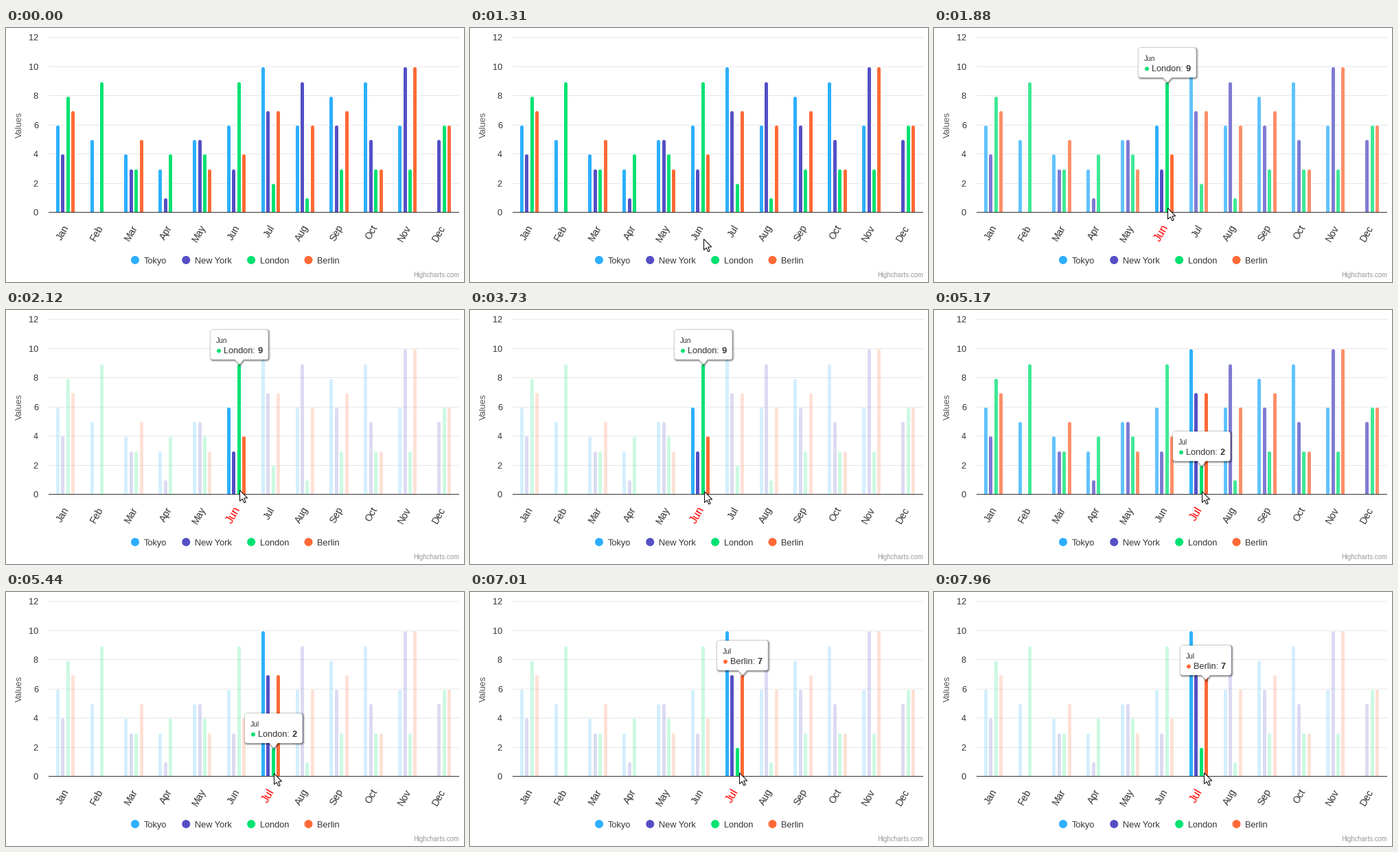
A matplotlib script for the animation above (8000 ms loop, 667 by 370 pixels).

```python
import numpy as np
import matplotlib.pyplot as plt
from matplotlib.animation import FuncAnimation
from matplotlib.collections import PolyCollection
from matplotlib.colors import to_rgb
from matplotlib.patches import Circle, PathPatch, Polygon, Rectangle
from matplotlib.path import Path

W, H, DPI = 667, 370, 100
STEP, LOOP = 40, 8000
PX = 72 / DPI
LEFT, RIGHT, TOP, BASE = 62, 660, 13, 268
SLOT = (RIGHT - LEFT) / 12
INK = "#333333"

plt.rcParams["font.family"] = "Liberation Sans"

MONTHS = "Jan Feb Mar Apr May Jun Jul Aug Sep Oct Nov Dec".split()
JUN, JUL = 5, 6
LONDON, BERLIN = 2, 3
SERIES = [
    ("Tokyo", "#2caffe", [6, 5, 4, 3, 5, 6, 10, 6, 8, 9, 6, 0]),
    ("New York", "#544fc5", [4, 0, 3, 1, 5, 3, 7, 9, 6, 5, 10, 5]),
    ("London", "#00e272", [8, 9, 3, 4, 4, 9, 2, 1, 3, 3, 3, 6]),
    ("Berlin", "#fe6a35", [7, 0, 5, 0, 3, 4, 7, 6, 7, 3, 10, 6]),
]

# Hover events in ms
ENTER_JUN, LEAVE_JUN, HIDE_TIP, ENTER_JUL = 1750, 3920, 4400, 5030
SWITCHES = [(6390, BERLIN), (7025, LONDON), (7750, BERLIN)]

# Pointer moves: start, end, destination
MOVES = [(50, 510, (340, 315)), (1190, 1880, (340, 262)),
         (3710, 4210, (365, 302)), (4560, 5170, (390, 264))]
MOVES += [(t - 50, t + 30, (393.4 if s == BERLIN else 390, 263)) for t, s in SWITCHES]

fig = plt.figure(figsize=(W / DPI, H / DPI), dpi=DPI, facecolor="white")
ax = fig.add_axes([0, 0, 1, 1])
ax.set_xlim(0, W)
ax.set_ylim(H, 0)
ax.axis("off")


def label(x, y, s, size=12.8, color=INK, **kw):
    return ax.text(x, y, s, fontsize=size * PX, color=color, **kw)


def text_width(s):
    probe = label(0, 0, s)
    width = probe.get_window_extent().width
    probe.remove()
    return width


def rule(row, color, z):
    ax.add_patch(Rectangle((LEFT, row), RIGHT - LEFT, 1, fc=color, lw=0, zorder=z))


def center(month):
    return LEFT + SLOT * (month + 0.5)


def bar_box(series, month):
    """Left edge and top of one column, on whole pixels."""
    group = SLOT * 0.6
    x = np.floor(center(month) + (series - 1.5) * group / 4 - 2.49)
    unit = (BASE - TOP - 1) / 12
    return x, np.floor(BASE + 1.6 - unit * SERIES[series][2][month])


def bar_shape(x, top, grow=0):
    r = 2.5 + grow
    a = np.linspace(np.pi, 2 * np.pi, 13)
    arc = np.column_stack([x + 2.5 + r * np.cos(a), top + 2.5 + r * np.sin(a)])
    return np.vstack([arc, (x + 5 + grow, BASE), (x - grow, BASE)])


# Axes
for v in range(0, 13, 2):
    row = np.floor(BASE + 0.5 - (BASE - TOP) * v / 12)
    rule(row, "#e6e6e6" if v else INK, 1 if v else 4)
    label(47, row + 5, str(v), ha="right")
label(22.5, 140.5, "Values", color="#555555", rotation=90, rotation_mode="anchor", ha="center")
label(RIGHT, 363, "Highcharts.com", 9.6, "#999999", ha="right")
ticks = [label(center(i) + 5.5, 290, m, 14, rotation=60, rotation_mode="anchor", ha="right")
         for i, m in enumerate(MONTHS)]

# Legend, each item following the text before it
x = 188
for name, color, _ in SERIES:
    ax.add_patch(Circle((x, 338), 6, fc=color, lw=0))
    label(x + 13, 343, name)
    x += 13 + text_width(name) + 28

# Columns, each on a white outline
cells = [(s, m) for s in range(4) for m in range(12) if SERIES[s][2][m]]
months = np.array([m for _, m in cells])
rims = PolyCollection([bar_shape(*bar_box(*c), grow=1) for c in cells], lw=0, zorder=2)
bars = PolyCollection([bar_shape(*bar_box(*c)) for c in cells], lw=0, zorder=3)
bar_rgba = np.array([(*to_rgb(SERIES[s][1]), 1) for s, _ in cells])
rim_rgba = np.ones_like(bar_rgba)
ax.add_collection(rims)
ax.add_collection(bars)

# Tooltip and pointer
TIP_H, ARROW = 43, 7
TIP_W = {s: 27 + text_width(SERIES[s][0] + ": 0") for s in (LONDON, BERLIN)}


def tip_home(series, month):
    x, top = bar_box(series, month)
    return np.array([x + 3 - TIP_W[series] / 2, top - TIP_H - ARROW])


def tip_shape(x, y, w, r=3):
    b, m, e = y + TIP_H, x + w / 2, x + w
    M, L, C = Path.MOVETO, Path.LINETO, Path.CURVE3
    pts = [(x + r, y), (e - r, y), (e, y), (e, y + r), (e, b - r), (e, b), (e - r, b),
           (m + 6, b), (m, b + ARROW), (m - 6, b), (x + r, b), (x, b), (x, b - r),
           (x, y + r), (x, y), (x + r, y)]
    return Path(pts, [M, L, C, C, L, C, C, L, L, L, L, C, C, L, C, C])


blank = tip_shape(0, 0, 80)
shadows = [ax.add_patch(PathPatch(blank, fill=False, ec="black", lw=w * PX, zorder=6))
           for w in (6, 4, 2)]
tip_box = ax.add_patch(PathPatch(blank, fc="white", lw=0, zorder=7))
tip_dot = ax.add_patch(Circle((0, 0), 3, lw=0, zorder=8))
tip_head = label(0, 0, "", 10.2, zorder=8)
tip_name = label(0, 0, "", zorder=8)
tip_value = label(0, 0, "", ha="right", weight="bold", zorder=8)
tip_parts = [tip_box, tip_dot, tip_head, tip_name, tip_value]

arrow = np.array([(0, 0), (0, 16), (3.7, 12.6), (6.3, 18.3), (8.7, 17.3),
                  (6.2, 11.6), (11.2, 11.4)]) + 0.5
pointer = ax.add_patch(Polygon(arrow, fc="white", ec="black", lw=PX,
                               joinstyle="miter", zorder=10))


def ease(t, start, span=370):
    p = np.clip((t - start) / span, 0, 1)
    return 0.5 - 0.5 * np.cos(np.pi * p)


def tip_state(t):
    """Series, month, position and opacity of the tooltip."""
    if t < ENTER_JUL:
        alpha = np.clip(1 - (t - HIDE_TIP) / 100, 0, 1) if t >= ENTER_JUN else 0
        return LONDON, JUN, tip_home(LONDON, JUN), alpha
    series, pos = LONDON, tip_home(LONDON, JUL)
    ends = [start for start, _ in SWITCHES[1:]] + [LOOP]
    for (start, target), end in zip(SWITCHES, ends):
        if t >= start:
            # A third of the remaining way every 32 ms
            home = tip_home(target, JUL)
            pos = home + (pos - home) * (2 / 3) ** ((min(t, end) - start) / 32)
            series = target
    return series, JUL, pos, 1


def draw_tip(t):
    series, month, pos, alpha = tip_state(t)
    x, y = np.round(pos)
    name, color, values = SERIES[series]
    w = TIP_W[series]
    tip_box.set_path(tip_shape(x, y, w))
    for i, patch in enumerate(shadows):
        patch.set_path(tip_shape(x + 1, y + 1, w))
        patch.set_alpha(0.06 * 2 ** i * alpha)
        patch.set_visible(alpha > 0)
    tip_dot.center = x + 12, y + 30.5
    tip_dot.set_facecolor(color)
    for text, tx, ty, s in [(tip_head, x + 8, y + 19, MONTHS[month]),
                            (tip_name, x + 19, y + 34, name + ":"),
                            (tip_value, x + w - 8, y + 34, str(values[month]))]:
        text.set_position((tx, ty))
        text.set_text(s)
    for part in tip_parts:
        part.set_alpha(alpha)
        part.set_visible(alpha > 0)


def pointer_at(t):
    pos = np.array([356.0, 372.0])
    for start, end, goal in MOVES:
        pos += (np.array(goal) - pos) * np.clip((t - start) / (end - start), 0, 1)
    return np.round(pos)


def update(i):
    t = i * STEP + 10
    dim = ease(t, ENTER_JUN) - ease(t, LEAVE_JUN) + ease(t, ENTER_JUL)
    active = JUN if t < HIDE_TIP else JUL
    alpha = np.where(months == active, 1, 1 - 0.8 * dim)
    for group, rgba in ((bars, bar_rgba), (rims, rim_rgba)):
        rgba[:, 3] = alpha
        group.set_facecolor(rgba)

    hovering = ENTER_JUN <= t < LEAVE_JUN or t >= ENTER_JUL
    for m, tick in enumerate(ticks):
        hot = hovering and m == active
        tick.set_color("red" if hot else INK)
        tick.set_fontsize((16 if hot else 14) * PX)

    draw_tip(t)
    pointer.set_xy(arrow + pointer_at(t))
    return []


anim = FuncAnimation(fig, update, frames=LOOP // STEP, interval=STEP,
                     repeat=True, repeat_delay=0, blit=False)
plt.show()
```
